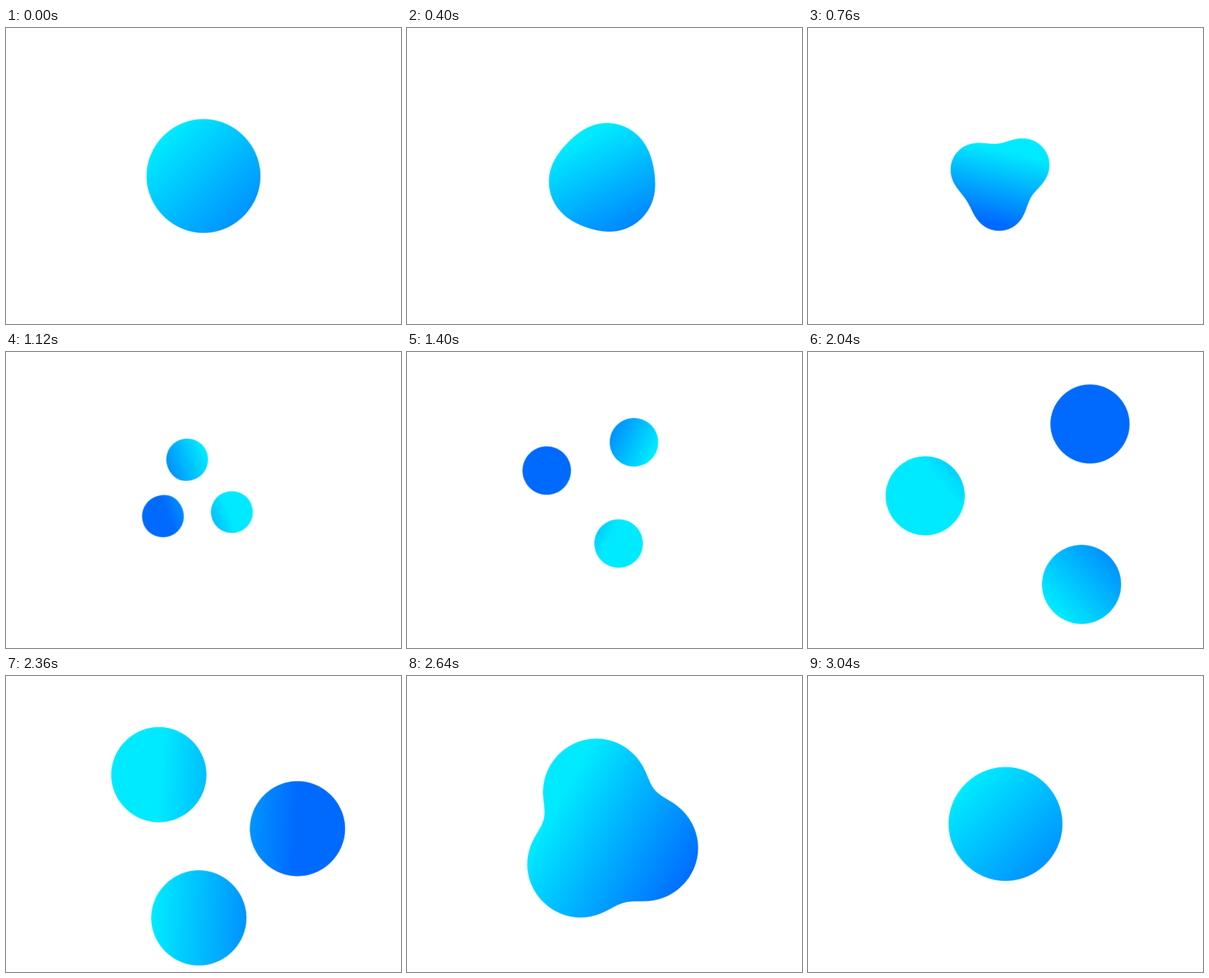
Recreate the animation shown at these times as an HTML page. Size 560 by 420 pixels, loop 3.08 s.

```html
<!DOCTYPE html>
<html lang="en">
<head>
<meta charset="utf-8">
<title>Gooey blobs</title>
<style>
  html, body { margin: 0; width: 100%; height: 100%; overflow: hidden; background: #fff; }
  svg { display: block; width: 100%; height: 100%; }
</style>
</head>
<body>
<svg viewBox="0 0 560 420">
  <defs>
    <linearGradient id="shade" gradientUnits="userSpaceOnUse" x1="-.78" y1="-.78" x2="1.56" y2="1.56">
      <stop offset="0" stop-color="#00eaff"/>
      <stop offset="1" stop-color="#006aff"/>
    </linearGradient>
    <!-- Blur, then cut the alpha at a threshold so that close circles melt together -->
    <filter id="goo" filterUnits="userSpaceOnUse" x="-100" y="-100" width="760" height="620"
            color-interpolation-filters="sRGB">
      <feGaussianBlur stdDeviation="18"/>
      <feColorMatrix values="0 0 0 0 1  0 0 0 0 1  0 0 0 0 1  0 0 0 40 -10.3"/>
    </filter>
    <mask id="blobs" maskUnits="userSpaceOnUse" x="0" y="0" width="560" height="420">
      <g filter="url(#goo)" fill="#fff">
        <circle/><circle/><circle/>
      </g>
    </mask>
  </defs>
  <rect width="560" height="420" fill="url(#shade)" mask="url(#blobs)"/>
</svg>
<script>
  const LOOP = 3080, STEP = 40;
  const CX = 280, CY = 210;
  const R_MAX = 71.5, R_MIN = 24.7, SPREAD = 2.46;
  const DIRS = [[1, 1], [-1, 1], [0, -1]];

  const shade = document.getElementById('shade');
  const circles = document.querySelectorAll('circle');

  // Smooth 0 to 1 between two times
  const ease = (t, from, to) => {
    const p = Math.min(1, Math.max(0, (t - from) / (to - from)));
    return p * p * (3 - 2 * p);
  };

  function draw(t) {
    const turn = 2 * Math.PI * ease(t, 0, 3000);
    const shrink = ease(t, 0, 1000) - ease(t, 1040, 3040);
    const radius = R_MAX - (R_MAX - R_MIN) * shrink;
    const offset = SPREAD * radius * (ease(t, 110, 1670) - ease(t, 1910, 3040));
    const cos = Math.cos(turn), sin = Math.sin(turn);

    DIRS.forEach(([x, y], i) => {
      const c = circles[i];
      c.setAttribute('cx', CX + offset * (x * cos - y * sin));
      c.setAttribute('cy', CY + offset * (x * sin + y * cos));
      c.setAttribute('r', radius);
    });
    shade.setAttribute('gradientTransform',
      `translate(${CX} ${CY}) rotate(${turn * 180 / Math.PI}) scale(${radius})`);
  }

  function tick() {
    const t = performance.now() % LOOP;
    draw(Math.floor(t / STEP) * STEP);
    requestAnimationFrame(tick);
  }
  draw(0);
  requestAnimationFrame(tick);
</script>
</body>
</html>
```
